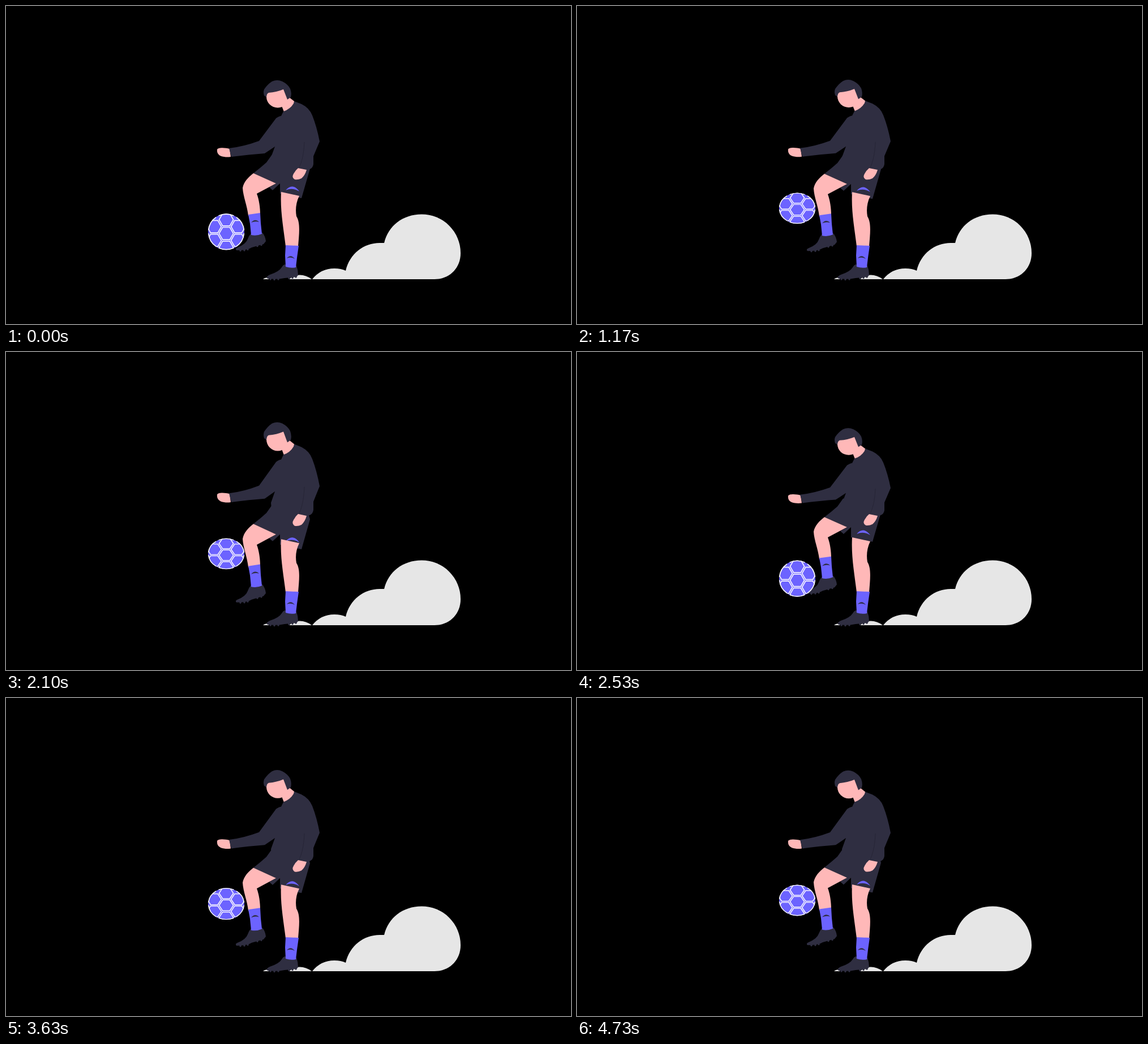
Write an HTML page that moves like this. It is 998 px wide and 561 px high and loops after 4760 ms.

```html
<!DOCTYPE html>
<html lang="en">
<head>
<meta charset="utf-8">
<title>Keepy-uppy</title>
<style>
  html, body { margin: 0; width: 100%; height: 100%; overflow: hidden; background: #000; }
  svg { display: block; width: 998px; height: 561px; }
  .dark { fill: #2f2e41; }
  .skin { fill: #ffb8b8; }
  .blue { fill: #6c63ff; }
  .cloud { fill: #e6e6e6; }
  .seam { fill: none; stroke: #f4f3ff; stroke-width: 1.7; }
  .studs { fill: none; stroke: #2f2e41; stroke-width: 3.4; stroke-linecap: round; }
</style>
</head>
<body>
<svg viewBox="0 0 998 561">
  <defs>
    <clipPath id="round"><circle cx="389" cy="400" r="32"/></clipPath>
  </defs>

  <g class="cloud">
    <path d="M541 482Q556 463 580 463Q592 463 600 467C607 437 632 418 660 418L668 418C675 388 701 367.5 734 367.5A68.5 68.5 0 0 1 803 436C803 463 783 482 757 482Z"/>
    <path d="M500 482Q507 474.500 519 474.500Q530 474.500 540 482Z"/>
    <path d="M454 482Q457 479 464 479V482Z"/>
  </g>

  <g id="kick">
    <path class="dark" d="M470 262L460 276Q450 285 437 295L477 313L465 320L471 325L484 313V331L522 339L537 287L530 262Z"/>
    <path class="blue" d="M494 325Q506 311 518 327Q506 319.500 494 325Z"/>
    <path class="skin" d="M437 295L477 313L443 331C447 342 449 355 449 369L428 370C426 352 419 337 418 321C420 310 428 302 437 295Z"/>
    <path class="dark" d="M433 401L453 400Q458 406 459 415L455 420L434 426Q427 431 407 431Q404 428 409 426Q424 420 427 411Q429 405 433 401Z"/>
    <path class="studs" d="M414 431V431.500M421 430V431M427 428.500V429.500M444 422V423.500M451 420V421.500"/>
    <path class="blue" d="M428 368L449 365L450 383L452 402Q443 406 433 404L431 384Z"/>
    <path class="dark" d="M433 382Q440 374 447 381Q440 379 433 382Z"/>
  </g>

  <path id="stand" class="skin" d="M486 328L518 335C512 347 511 360 513 371C520 382 518 400 516 424H494C490 391 484 360 486 328Z"/>
  <path class="dark" d="M492 456L513 458Q516 466 516 475L513 478L492 480Q480 483 462 481Q458 478 466 474Q482 469 487 461Q489 457 492 456Z"/>
  <path class="studs" d="M467 481V482M474 481V482.500M481 481V482M500 478.500V480.500M506 478V479.500M512 477V478"/>
  <path class="blue" d="M494 422L517 423L514 444L512 461Q503 463 494 460L493 440Z"/>
  <path class="dark" d="M496 445Q503 437 510 446Q503 442 496 445Z"/>

  <g id="torso">
    <path class="skin" d="M397 266Q391 267 385 266C376 265 372 260 373 253C375 249 388 250 395 252Z"/>
    <path class="skin" d="M486 174L500 161L509 168V177L492 189Z"/>
    <path class="dark" d="M509 168L522 173Q536 180 541 193Q549 213 554 239L543 265V279Q542 286 536 288H470L468 267L475 248L457 260Q430 262 398 266L394 251Q420 248 447 238L477 198Q483 194 486 194L490 186Q502 182 508 172Z"/>
    <path d="M527 240Q526 268 518 285" fill="none" stroke="#272637"/>
    <path class="skin" d="M516 286L531 289Q528 299 522 304Q516 307 510 306Q504 302 508 296Q511 290 516 286Z"/>
    <ellipse class="skin" cx="480" cy="160" rx="20" ry="19.500"/>
    <path class="dark" d="M460 161L456 158Q454 152 456 147Q462 138 470 133Q479 129 488 133Q498 138 502 146Q505 154 503 161L497 165L490 147Q478 152 464 153Q460 155 460 161Z"/>
  </g>

  <g id="ball">
    <circle class="blue" cx="389" cy="400" r="32"/>
    <g id="seams" clip-path="url(#round)"></g>
    <circle class="seam" cx="389" cy="400" r="31.500" pathLength="360" stroke-dasharray="50 10" stroke-dashoffset="-5"/>
  </g>
</svg>
<script>
  const LOOP = 4760;
  const $ = id => document.getElementById(id);
  const kick = $('kick'), stand = $('stand'), torso = $('torso'), ball = $('ball');
  const wrap = x => x - Math.floor(x);
  const out = (p, b) => 1 - (1 - p) ** 3 * (1 + b * p);

  function polar(x, y, r, deg) {
    const a = deg * Math.PI / 180;
    return [x + r * Math.cos(a), y + r * Math.sin(a)];
  }

  function hexagon(x, y) {
    const points = [0, 60, 120, 180, 240, 300].map(a => polar(x, y, 12.6, a).map(v => v.toFixed(1)));
    return `<polygon class="seam" points="${points.join(' ')}"/>`;
  }

  const centres = [[389, 403]];
  for (let a = 30; a < 390; a += 60) centres.push(polar(389, 403, 24.5, a));
  $('seams').innerHTML = centres.map(c => hexagon(...c)).join('');

  // Vertical scale around a fixed height.
  function stretch(el, k, y) {
    el.setAttribute('transform', `matrix(1 0 0 ${k} 0 ${y * (1 - k)})`);
  }

  // Body stretch: quick settling, even rise.
  function bodyAt(t) {
    const p = wrap((t - 613) / 800) * 2;
    return p < 1 ? 1 - out(p, 1.7) : (1 - Math.cos(Math.PI * (p - 1))) / 2;
  }

  function liftAt(t) {
    const p = wrap(t / 850 + 0.03);
    return out(1 - Math.abs(1 - 2 * p), 2.7);
  }

  function draw(t) {
    const d = bodyAt(t) - 0.27;
    stretch(torso, 1 + 0.0815 * d, 290);
    stretch(stand, 1 - 0.045 * d, 422);
    kick.setAttribute('transform', `matrix(1 0 0 ${1 + 0.033 * d} 0 ${5.4 * d})`);
    stretch(ball, 1 - 0.154 * liftAt(t), 114);
  }

  const start = performance.now();
  function tick() {
    draw((performance.now() - start) % LOOP);
    requestAnimationFrame(tick);
  }
  tick();
</script>
</body>
</html>
```
